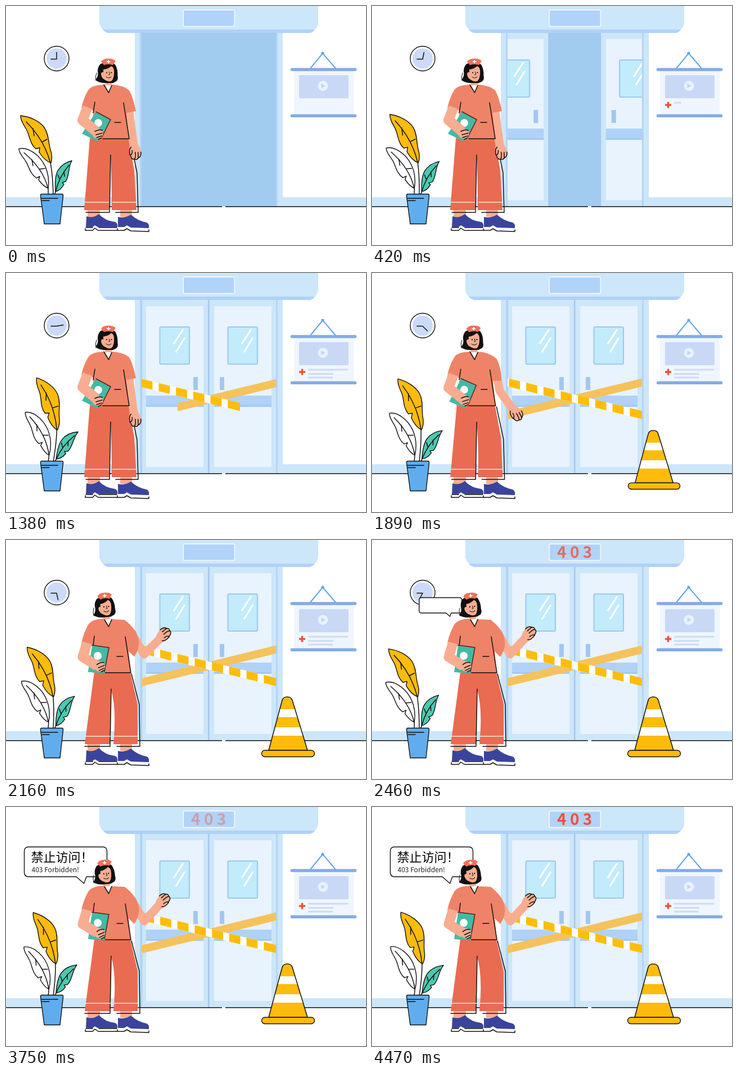
Write an HTML page that moves like this. It is 640 px wide and 425 px high and loops after 4.5 s.

```html
<!DOCTYPE html>
<html lang="zh">
<head>
<meta charset="utf-8">
<title>403</title>
<style>
  html, body { margin: 0; width: 100%; height: 100%; overflow: hidden; background: #fff; }
  svg { display: block; width: 100vw; height: 100vh; }
  text { font-family: "Noto Sans CJK SC", "Noto Sans CJK JP", "Noto Sans", sans-serif; }
  .ink { fill: none; stroke: #111; stroke-width: 1.5; stroke-linecap: round; stroke-linejoin: round; }
  .edge { stroke: #111; stroke-width: 1.4; stroke-linejoin: round; }
  .skin { fill: #f8ad91; }
  .limb { fill: none; stroke: #f8ad91; stroke-linejoin: round; }
</style>
</head>
<body>
<svg viewBox="0 0 640 425" preserveAspectRatio="none">
  <defs>
    <clipPath id="doorway"><path d="M241 48H480V356H241Z"/></clipPath>
    <g id="panel">
      <path fill="#cce6fa" d="M0 48H120V356H0Z"/>
      <path fill="#e8f3fe" d="M9 59H111V345H9Z"/>
      <path fill="#b0d2f8" d="M9 218H111V237H9Z"/>
      <path fill="#a3c9f2" d="M9 235H111V238H9Z"/>
      <rect x="33.500" y="96" width="52.500" height="66" rx="2" fill="#c2ebfc" stroke="#9cc8ee" stroke-width="2"/>
      <path d="M75 100L58 126M78 115L62 141" stroke="#fff" stroke-width="3"/>
    </g>
  </defs>

  <!-- wall, floor and door frame -->
  <path fill="#cce6fa" d="M0 340H230V356H0ZM491 340H640V356H491ZM229 48H492V356H229Z"/>
  <path fill="#b3d5f6" d="M238 48H241V356H238ZM480 48H483V356H480Z"/>
  <path fill="#a2cbf0" d="M241 48H480V356H241Z"/>
  <g clip-path="url(#doorway)">
    <g id="doorL">
      <use href="#panel" x="240"/>
      <path fill="#a3c7f0" d="M333 185H341V208H333ZM359 48H361V356H359Z"/>
      <path fill="#a9cdf0" d="M240 48H242V356H240Z"/>
    </g>
    <g id="doorR">
      <use href="#panel" x="361"/>
      <path fill="#a3c7f0" d="M380 185H388V208H380ZM360 48H361.5V356H360Z"/>
    </g>
    <g id="tapeR"><g transform="translate(241 245.500) skewY(-13.700)"><path d="M0 7.500H239" stroke="#f5c25c" stroke-width="14.500"/></g></g>
    <g id="tapeL"><g transform="translate(241 187) skewY(13.700)">
      <path d="M239 7.300H0" stroke="#fff" stroke-width="14.500"/>
      <path d="M239 7.300H237M237 7.300H0" stroke="#fdbd0a" stroke-width="14.500" stroke-dasharray="19.700 11"/>
    </g></g>
  </g>
  <path fill="#cce6fa" d="M166 0H555V32Q552 42 541 48H181Q169 42 166 32Z"/>
  <path fill="#b0d2f8" d="M172 42H549Q545 48 537 48H185Q177 48 172 42Z"/>
  <rect x="315" y="7" width="91.500" height="29.500" rx="3" fill="#b1d3f9" stroke="#edf6ff" stroke-width="2"/>
  <text id="code" x="329" y="31.500" font-size="28" font-weight="700" fill="#f0503a">4 0 3</text>
  <path d="M0 356.800H384M390 356.800H640" stroke="#111" stroke-width="1.400"/>

  <!-- poster -->
  <path d="M541 111L563 84L586 111" fill="none" stroke="#5fa4ef" stroke-width="2"/>
  <circle cx="563" cy="84" r="2.600" fill="#5fa4ef"/>
  <path fill="#eff6ff" d="M512 114H618V194H512Z"/>
  <rect x="521" y="123" width="88" height="41" rx="2" fill="#c9d8f5"/>
  <circle cx="563.500" cy="142" r="9" fill="#e9f1ff"/>
  <path fill="#c2d4f2" d="M560.500 138L567.500 142L560.500 146Z"/>
  <path d="M508.500 113H620.500M508.500 195.300H620.500" stroke="#85abe3" stroke-width="5.600" stroke-linecap="round"/>
  <path id="plus" d="M-5.500 0H5.500M0 -5.500V5.500" stroke="#f0503a" stroke-width="3.400"/>
  <g id="lines" stroke="#cddcf3" stroke-width="3"></g>

  <!-- clock -->
  <circle cx="90" cy="93.500" r="22" fill="#fff" class="edge"/>
  <circle cx="90" cy="93.500" r="18" fill="#cbdaf8"/>
  <path class="ink" d="M80 94.500H89"/>
  <path class="ink" id="hand" d="M90 94.500V82.500"/>

  <!-- plant -->
  <g id="leafW">
    <path class="edge" fill="#fff" d="M23 254C34 251 47 258 57 267C72 282 78 303 75 324C69 322 63 316 58 309L60 303L54 306C42 298 41 285 35 276C30 268 23 262 23 254Z"/>
    <path class="ink" d="M32 261Q66 289 75 325V336M46 273L48 284M59 290L69 289"/>
  </g>
  <g id="leafY">
    <path class="edge" fill="#fdbb0b" d="M26 195C44 197 60 205 68 216C77 229 75 246 80 259Q83 270 80 279C71 276 64 268 59 260L60 252L53 254C42 245 42 229 36 219C31 211 26 203 26 195Z"/>
    <path class="ink" d="M36 206Q68 238 79 279Q83 300 84 336M48 218L50 231M64 242L73 237"/>
  </g>
  <g id="leafG">
    <path class="edge" fill="#4cc9b0" d="M117 275C106 278 97 284 92 293C87 302 87 316 88 330C95 328 100 323 103 317L100 314L106 312C113 303 110 287 117 275Z"/>
    <path class="ink" d="M112 283Q94 304 88 331L86 336M103 294L104 303M95 307L92 300"/>
  </g>
  <path class="edge" fill="#60adee" d="M63 334.500H100Q102 335 101.500 338L96 387.500H68L61.500 338Q61 335 63 334.500Z"/>
  <path class="ink" d="M63 342H92M64 346H77"/>

  <!-- cone -->
  <g id="cone">
    <path fill="#fdbb0b" d="M491 285Q493 279 500 279Q507 279 509 285L536 374H467Z"/>
    <path fill="#fff" d="M487 301H514L518 315H483ZM477 333H523.500L528 348H473Z"/>
    <path class="ink" d="M491 285Q493 279 500 279Q507 279 509 285L536 374H467Z"/>
    <rect x="454.500" y="374" width="94" height="11.500" rx="5.700" fill="#fdbb0b" class="edge"/>
  </g>

  <!-- speech bubble -->
  <g id="bubble">
    <path class="edge" vector-effect="non-scaling-stroke" fill="#fff" d="M40 71H172Q179.500 71 179.500 79V116Q179.500 124 172 124H143L138.500 136L125 124H40Q32.500 124 32.500 116V79Q32.500 71 40 71Z"/>
    <text id="title" x="44.500" y="97" font-size="22" font-weight="500">禁止访问！</text>
    <text id="sub" x="45.500" y="115.500" font-size="12" fill="#222">403 Forbidden!</text>
  </g>

  <!-- nurse -->
  <path class="skin" d="M145 360H167V375H145ZM203 360H224V375H203Z"/>
  <path fill="#3b449c" d="M143 374Q155 378 165 370Q176 382 194 384Q199 386 198 393H163L158 390L154 393H142ZM199 375Q211 378 222 371Q234 382 250 385Q255 387 254 395L222 394L215 390L210 393H199Z"/>
  <path class="ink" d="M141 396V399H154L158 395L164 399H198V396M198 399H210L215 396L222 400L254 401V398M142 394H154M165 394H197"/>
  <path id="pants" fill="#e96b52"/>
  <path id="seams" class="ink"/>
  <path id="cuffs" stroke="#fbe3da" stroke-width="1.400"/>
  <path id="arm" class="limb" stroke-width="15"/>
  <g id="palm">
    <path class="skin" d="M-7.500 -2Q-11 8 -9 16Q-6 25 2 24Q11 23 11 12Q11 4 7.500 -2Z"/>
    <path class="ink" d="M-5 1Q-10 4 -9 15M-9 15Q-4 14 -4 7M-8 16Q-7 24 -2 23Q1 20 1 11M-2 23Q3 26 5 21L6 12M5 22Q11 20 11 12"/>
  </g>
  <path id="shirt" fill="#ee8368"/>
  <path fill="#fff" d="M175 139L182 154L189 139Z"/>
  <path class="ink" d="M174 140L182.500 154L188 141"/>
  <path id="folds" class="ink"/>
  <path id="book" fill="#45b9a3"/>
  <path id="cover" class="ink" style="stroke:#5a2018"/>
  <circle id="badge" r="7" fill="#fff"/>
  <path id="grip" class="limb" stroke-width="18"/>
  <g id="fist">
    <ellipse class="skin" cx="1" cy="0" rx="9.500" ry="9"/>
    <path class="ink" d="M-4 -4Q3 -8 9 -6M-2 2L9 -1M-1 7L8 4M2 10L7 8"/>
  </g>
  <g id="head">
    <path class="skin" d="M176 130H188V141H176Z"/>
    <path fill="#111" d="M168 103Q181 97 194 104Q199 112 198.500 124Q200 131 196 134L190 137H178Q164 137 159 131Q165 125 163 116Q163 108 168 103Z"/>
    <path class="skin" d="M173 113Q182 112 187 107Q191 108 192 114Q193 127 188 133Q183 136 177 132Q170 129 169 122Q169 117 173 118Z"/>
    <circle cx="179" cy="118.500" r="1.100"/><circle cx="187.500" cy="118.500" r="1.100"/>
    <path class="ink" style="stroke-width:1" d="M183.500 117L184.500 122H182.500M178 126Q183 130 187 126M161 119Q158 126 160 133"/>
    <path fill="#ef7259" d="M169 99Q173 93 182 93.500Q191 93 195 98L190 105Q182 102 174 105Z"/>
    <path d="M179 99H185.500M182.200 96V102" stroke="#fff" stroke-width="1.800"/>
  </g>
</svg>
<script>
const LOOP = 4500, STEP = 30, SWAY = 2780;
const $ = id => document.getElementById(id);
const clamp = v => Math.max(0, Math.min(1, v));
const lerp = (a, b, k) => a + (b - a) * k;
const span = (t, a, b) => clamp((t - a) / (b - a));
const smooth = k => k * k * (3 - 2 * k);
const cubic = k => k < .5 ? 4 * k ** 3 : 1 - (2 - 2 * k) ** 3 / 2;
const put = (id, value) => $(id).setAttribute('transform', value);
const zoom = (id, x, y, s) => put(id, `translate(${x} ${y}) scale(${s}) translate(${-x} ${-y})`);

// Piecewise eased value from [time, value] steps
function track(steps, t) {
  let i = 1;
  while (i < steps.length - 1 && t > steps[i][0]) i++;
  const [a, b] = [steps[i - 1], steps[i]];
  return lerp(a[1], b[1], smooth(span(t, a[0], b[0])));
}

// Blend two paths that share the same commands
function blend(a, b, k) {
  const ends = b.match(/-?[\d.]+/g);
  let i = 0;
  return a.replace(/-?[\d.]+/g, n => lerp(+n, +ends[i++], k).toFixed(2));
}

// Point at a distance from x, y; degrees turn away from straight down
function reach(x, y, len, deg) {
  const a = deg * Math.PI / 180;
  return [x + len * Math.sin(a), y + len * Math.cos(a)];
}

// Each part: arm lowered, arm raised
const poses = {
  pants: ['M149 235L139 363H183L186 266Q188 310 188 363H232L228 292L218 235Z',
          'M157 235L140 363H185L187 266Q197 300 191 363H234L234 292L221 235Z'],
  seams: ['M186 265L184 367H142M221 238L233 297L235 367H195',
          'M187 265L185 367H140M223 238L237 292L238 367H197'],
  cuffs: ['M140 349H183M189 349H232', 'M141 349H186M192 349H235'],
  shirt: ['M172 140Q151 141 146 150Q138 163 134 181L156 186L149 236H219L214 190L231 187Q226 162 219 150Q210 142 192 140Z',
          'M172 140Q152 141 146 151Q138 165 134 183L155 188L154 236H222L218 198L228 208L243 186Q231 163 222 150Q211 142 192 140Z'],
  folds: ['M158 171L155 190M209 172L219 236H172M193 207H204',
          'M157 171L155 188M212 172L222 236H172M197 207H208'],
  book: ['M160 188L187 203L163 241L135 227Z', 'M153 187L183 191L176 237L146 235Z'],
  cover: ['M160 188L186 202L170 234', 'M152 187L183 191L175 234'],
  grip: ['M145 180L136 203L160 223', 'M144 183L136.500 208L162 224']
};

const rules = [[172, 71], [179.5, 45], [186, 44]];
$('lines').innerHTML = rules.map(() => '<path/>').join('');

function drawNurse(t) {
  const k = cubic(span(t, 1665, 2265));
  for (const id in poses) $(id).setAttribute('d', blend(...poses[id], k));
  const upper = lerp(7, 31, k), fore = lerp(8, 137, k);
  const shoulder = [lerp(215, 217, k), 155];
  const elbow = reach(...shoulder, 56, upper), wrist = reach(...elbow, 39, fore);
  $('arm').setAttribute('d', `M${reach(...shoulder, 22, upper)}L${elbow}L${wrist}`);
  put('palm', `translate(${wrist}) rotate(${-fore})`);
  put('badge', `translate(${lerp(164, 163, k)} ${lerp(208, 206, k)})`);
  put('fist', `translate(${lerp(162, 166, k)} ${lerp(227, 225, k)}) rotate(${-8 * k})`);
  put('head', `translate(${-3 * k} 0) rotate(${-5.5 * k} 182 140)`);
}

function drawRoom(t) {
  const open = 121 * (1 - smooth(span(t, 30, 700)));
  put('doorL', `translate(${-open} 0)`);
  put('doorR', `translate(${open} 0)`);

  const left = 1 - span(t, 720, 1620);
  put('tapeL', `translate(${-240 * left} ${-54 * left})`);
  put('tapeR', `translate(${240 * left} ${-54 * left})`);

  put('plus', `translate(526.5 176) scale(${smooth(span(t, 150, 420))})`);
  rules.forEach(([y, len], i) => {
    const w = len * smooth(span(t, 330 + i * 90, 660 + i * 90));
    $('lines').children[i].setAttribute('d', w ? `M537 ${y}h${w}` : '');
  });

  put('hand', `rotate(${135 * (t / 1890) ** 1.635} 90 94.5)`);

  const sway = 5.6 * (1 - Math.cos(2 * Math.PI * t / SWAY));
  put('leafY', `rotate(${sway} 84 336)`);
  put('leafW', `rotate(${sway * .68} 76 336)`);
  put('leafG', `rotate(${sway} 84 336)`);

  zoom('cone', 501, 332.5, track([[1590, 0], [1770, 1.08], [1890, .98], [2010, 1.01], [2130, 1]], t));
  $('code').setAttribute('opacity', track([[2190, 0], [2580, 1], [3010, .25], [3440, 1], [3870, .25], [4300, 1]], t));
}

function drawBubble(t) {
  zoom('bubble', 138.5, 136, smooth(span(t, 2340, 2575)));
  zoom('title', 93, 89, track([[2580, 0], [2910, 1.1], [3270, 1]], t));
  $('sub').setAttribute('opacity', span(t, 2670, 2940));
}

const start = performance.now();
function frame() {
  const t = Math.floor((performance.now() - start) % LOOP / STEP) * STEP;
  drawRoom(t);
  drawBubble(t);
  drawNurse(t);
  requestAnimationFrame(frame);
}
frame();
</script>
</body>
</html>
```
